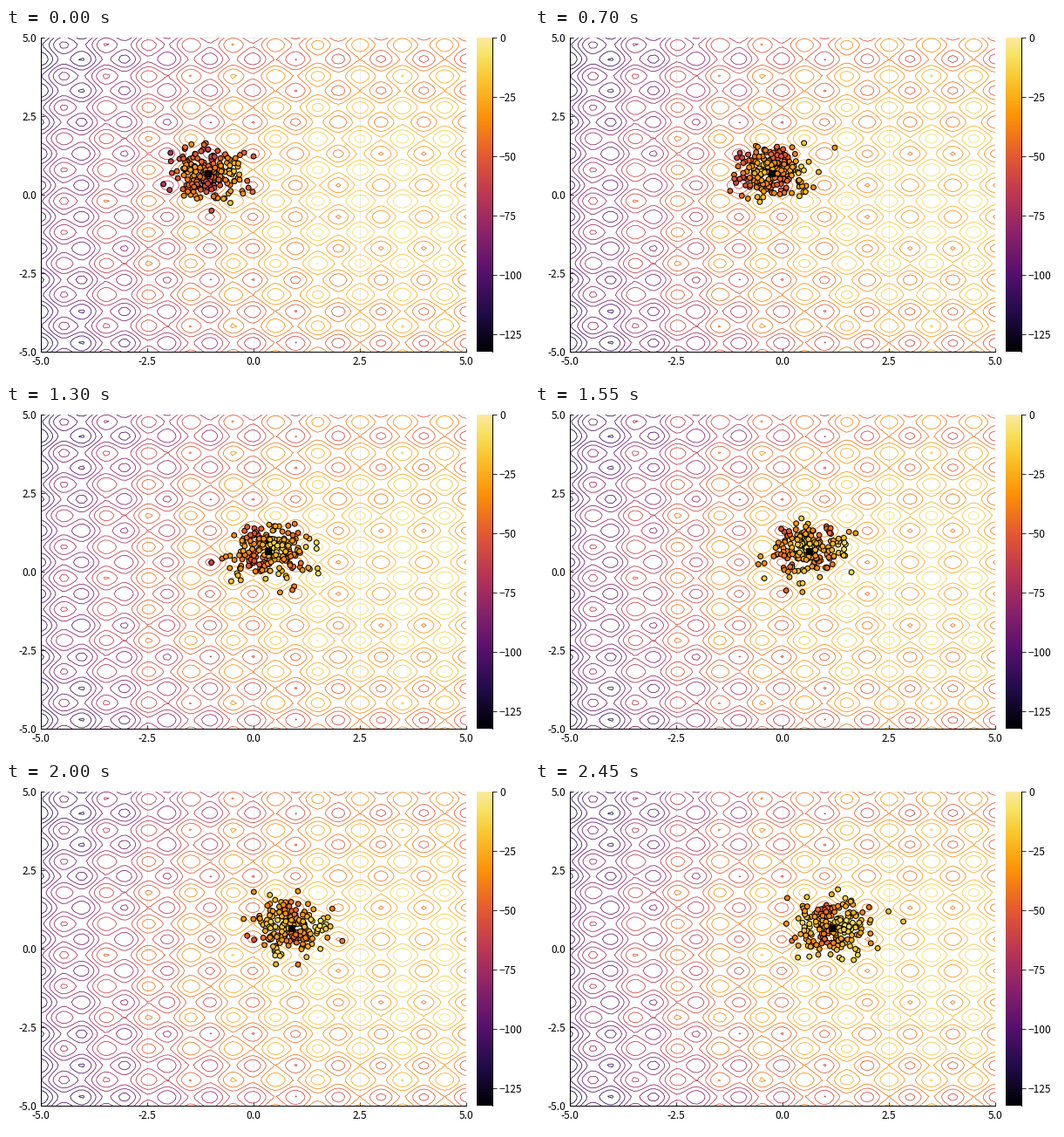
Recreate the animation shown at these times as a matplotlib script. Size 600 px wide and 400 px high, loop 2.5 s.

```python
import numpy as np
import matplotlib.pyplot as plt
from matplotlib.animation import FuncAnimation
from matplotlib.colors import LinearSegmentedColormap

W, H, DPI = 600, 400, 100
PX = 72 / DPI
FRAMES, INTERVAL = 50, 50
POP, SIGMA = 200, 0.42
PEAK = (3.5, -0.2)
VMIN, VMAX = -132.5, 0
TOP, HEIGHT = 11.3, 359.7

plt.rcParams["font.family"] = "Noto Sans CJK JP"
CMAP = LinearSegmentedColormap.from_list("heat", [
    (0, "#000004"), (0.125, "#210c4a"), (0.25, "#57106e"), (0.375, "#8a226a"),
    (0.5, "#bc3754"), (0.625, "#e45a31"), (0.75, "#fc9206"),
    (0.875, "#fbc830"), (0.95, "#f6e468"), (1, "#fee8a0")])


def fitness(x, y):
    """Negated Rastrigin function with a shifted optimum."""
    u, v = x - PEAK[0], y - PEAK[1]
    waves = np.cos(2 * np.pi * u) + np.cos(2 * np.pi * v)
    return -(20 + u**2 + v**2 - 10 * waves)


def mean_at(i):
    """Centre of the search, drifting right towards the optimum."""
    x = np.interp(i, [0, 8, 21, 31, 49], [-1.09, -0.53, 0.06, 0.61, 1.15])
    return np.array([x, 0.70 - 0.03 * i / FRAMES])


def sample(i):
    rng = np.random.default_rng(100 + i)
    return mean_at(i) + SIGMA * rng.normal(size=(POP, 2))


def add_axes(left, width):
    return fig.add_axes([left / W, 1 - (TOP + HEIGHT) / H, width / W, HEIGHT / H])


def trim_spines(axes, keep):
    for side, spine in axes.spines.items():
        spine.set_visible(side in keep)
        spine.set_linewidth(PX)


fig = plt.figure(figsize=(W / DPI, H / DPI), dpi=DPI, facecolor="white")

ax = add_axes(40, 488)
grid = np.linspace(-5, 5, 101)
gx, gy = np.meshgrid(grid, grid)
levels = np.linspace(VMIN, VMAX, 17)[1:-1]
ax.contour(gx, gy, fitness(gx, gy), levels, cmap=CMAP, vmin=VMIN, vmax=VMAX,
           linewidths=0.8 * PX, linestyles="solid", zorder=2)

ticks = np.linspace(-5, 5, 5)
labels = [f"{t:.1f}" for t in ticks]
ax.set_xticks(ticks, labels)
ax.set_yticks(ticks, labels)
ax.set(xlim=(-5, 5), ylim=(-5, 5))
ax.tick_params(direction="in", length=4 * PX, width=0.8 * PX,
               pad=5 * PX, labelsize=8.6)
ax.grid(color="black", alpha=0.1, linewidth=0.7 * PX)
ax.set_axisbelow(True)
trim_spines(ax, ("left", "bottom"))

bar = add_axes(540, 18)
bar.imshow(np.linspace(0, 1, 256)[:, None], cmap=CMAP, aspect="auto",
           origin="lower", extent=(0, 1, VMIN, VMAX))
bar.set_xticks([])
bar.yaxis.tick_right()
bar.set_yticks(range(0, -126, -25))
bar.tick_params(axis="y", length=5 * PX, width=0.8 * PX,
                pad=3 * PX, labelsize=8.6)
trim_spines(bar, ("right",))

dots = ax.scatter(np.zeros(POP), np.zeros(POP), c=np.zeros(POP), cmap=CMAP,
                  vmin=VMIN, vmax=VMAX, s=(5.8 * PX)**2, edgecolors="black",
                  linewidths=PX, zorder=4)
center = ax.scatter([0], [0], marker="s", s=(7 * PX)**2, c="black",
                    linewidths=PX, zorder=5)


def update(i):
    cloud = sample(i)
    dots.set_offsets(cloud)
    dots.set_array(fitness(*cloud.T))
    center.set_offsets([mean_at(i)])
    return dots, center


anim = FuncAnimation(fig, update, frames=FRAMES, interval=INTERVAL,
                     repeat=True, repeat_delay=0, blit=False)
plt.show()
```
